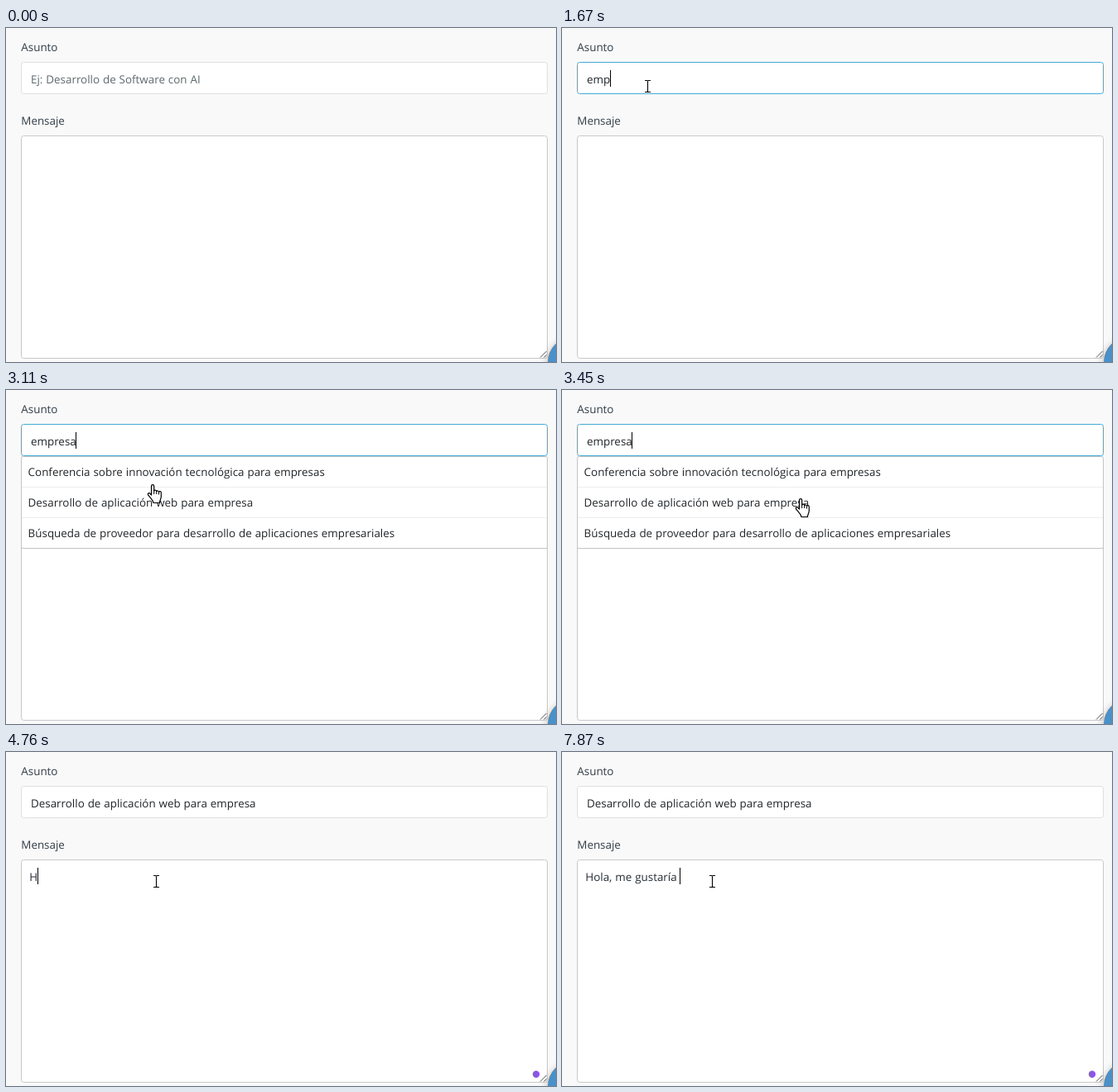
Recreate the animation shown at these times as an HTML page. Size 664 by 404 pixels, loop 8 s.

```html
<!DOCTYPE html>
<html lang="es">
<head>
<meta charset="utf-8">
<title>Formulario de contacto</title>
<style>
html, body { margin: 0; width: 100%; height: 100%; overflow: hidden; background: #f9f9f9; }
svg { display: block; width: 664px; height: 404px; }
text {
  font: 13.4px "Open Sans", "Noto Sans", sans-serif;
  word-spacing: .45px;
  white-space: pre;
  text-rendering: geometricPrecision;
  fill: #212529;
}
.label { fill: #313c46; }
</style>
</head>
<body>
<svg viewBox="0 0 664 404">
  <defs>
    <filter id="soft" x="-50%" y="-50%" width="200%" height="200%">
      <feGaussianBlur stdDeviation="5"/>
    </filter>
  </defs>
  <rect width="664" height="404" fill="#f9f9f9"/>

  <text class="label" x="18.3" y="28">Asunto</text>
  <text class="label" x="18.3" y="117">Mensaje</text>

  <rect id="field" x="18.5" y="41.5" width="635" height="38" rx="3" fill="#fff"/>
  <text id="subject" x="30" y="67"></text>

  <rect x="18.5" y="130.5" width="635" height="269" rx="3" fill="#fff" stroke="#c8c8c8"/>
  <text id="message" x="28.3" y="156"></text>
  <path d="M645 398.5l7.5-7.5M649.500 398.500l3-3" stroke="#555" fill="none"/>
  <circle id="dot" cx="640" cy="389.700" r="4.200" fill="#8957e5"/>

  <g id="list">
    <rect x="18.5" y="80.5" width="635" height="112" fill="#000" opacity=".06"/>
    <rect x="18.5" y="80.500" width="635" height="111" rx="2" fill="#fff" stroke="#c4c4c4"/>
    <path d="M19 117.5H653M19 154.5H653" stroke="#eee"/>
    <text x="26.6" y="104">Conferencia sobre innovación tecnológica para empresas</text>
    <text x="26.6" y="141">Desarrollo de aplicación web para empresa</text>
    <text x="26.6" y="178">Búsqueda de proveedor para desarrollo de aplicaciones empresariales</text>
  </g>

  <rect id="caret" width="1" height="20" fill="#000"/>

  <circle cx="684" cy="407" r="31" fill="#000" opacity=".24" filter="url(#soft)"/>
  <circle cx="684" cy="404" r="30" fill="#4a90c9"/>

  <g id="cursor">
    <path id="beam" d="M-3.500-7H-.8L0-6.300L.8-7H3.500M0-6.500V6.500M-3.500 7H-.8L0 6.300L.8 7H3.500"
      transform="translate(.5 .5)" fill="none" stroke="#000" stroke-width="1.1"/>
    <g id="hand" transform="translate(-6.500 -1)" stroke="#000" fill="#fff" stroke-linejoin="round">
      <path d="M5 13V2.200a1.600 1.600 0 0 1 3.200 0V8.500a1.500 1.500 0 0 1 3 .2a1.500 1.500 0 0 1 2.800.6a1.500 1.500 0 0 1 2.800.7V15c0 3-1.800 4-1.800 7.500H7.500C7 19 4 17 1 12.800C.2 11 2.300 10 3.600 11.400Z"
        stroke-width="1.200"/>
      <path d="M8.200 8.500V12M11.200 9V12M14 9.500V12.500" fill="none"/>
    </g>
    <path id="arrow" d="M0 0V16.500L3.800 13L6.300 18.500L8.800 17.400L6.400 12H11.500Z" fill="#fff" stroke="#000"/>
  </g>
</svg>
<script>
const LOOP = 8000, BLINK = 530;
const HINT = "Ej: Desarrollo de Software con AI";
const CHOICE = "Desarrollo de aplicación web para empresa";
const FOCUS = 650, OPEN = 2250, PICK = 3700, SWITCH = 4130;

const query = { text: "empresa", at: [1450, 1570, 1670, 1770, 1820, 1880, 1950] };
const note = {
  text: "Hola, me gustaría ",
  at: [4760, 4860, 4980, 5090, 5200, 5310, 5500, 5640, 5820,
       6030, 6150, 6280, 6410, 6550, 6680, 6950, 7080, 7330]
};
// time, x, y
const path = [
  [140, 190, 297], [600, 103, 70],
  [2760, 103, 70], [3110, 177, 115], [3600, 320, 137],
  [3930, 320, 137], [SWITCH, 181, 156]
];

const el = id => document.getElementById(id);
const show = (id, on) => el(id).setAttribute("visibility", on ? "visible" : "hidden");
const clamp = v => Math.min(1, Math.max(0, v));
const smooth = v => v * v * (3 - 2 * v);
const typed = (line, t) => line.text.slice(0, line.at.filter(k => k <= t).length);

function cursorAt(t) {
  let i = 0;
  while (i < path.length - 2 && t >= path[i + 1][0]) i++;
  const [t0, x0, y0] = path[i], [t1, x1, y1] = path[i + 1];
  const k = smooth(clamp((t - t0) / (t1 - t0)));
  return [Math.round(x0 + (x1 - x0) * k), Math.round(y0 + (y1 - y0) * k)];
}

function caretOn(t) {
  if (t < FOCUS) return false;
  if (t >= 7330) return t < 7600 || t >= 7870;
  const resets = [FOCUS, ...query.at, PICK, SWITCH, ...note.at];
  const last = Math.max(...resets.filter(k => k <= t));
  return Math.floor((t - last) / BLINK) % 2 === 0;
}

function setText(id, value, color) {
  const node = el(id);
  if (node.textContent !== value) node.textContent = value;
  node.style.fill = color;
}

function drawField(t) {
  const k = clamp((t - FOCUS) / 200) - clamp((t - SWITCH) / 200);
  const rest = [222, 224, 226], focus = [66, 170, 214];
  const rgb = rest.map((c, i) => Math.round(c + (focus[i] - c) * k));
  el("field").setAttribute("stroke", `rgb(${rgb})`);
  const value = t >= PICK ? CHOICE : typed(query, t);
  setText("subject", value || HINT, value ? "#212529" : "#5f686c");
  return value;
}

function drawCaret(t, value) {
  const inNote = t >= SWITCH;
  const width = inNote || value ? el(inNote ? "message" : "subject").getComputedTextLength() : 0;
  el("caret").setAttribute("x", Math.floor((inNote ? 28.3 : 30) + width));
  el("caret").setAttribute("y", inNote ? 140 : 51);
  show("caret", caretOn(t));
}

function drawCursor(t, open) {
  const [x, y] = cursorAt(t);
  const kind = y >= 80 && y < 192 && open ? "hand" : y >= 80 && y < 130 ? "arrow" : "beam";
  el("cursor").setAttribute("transform", `translate(${x} ${y})`);
  for (const id of ["beam", "hand", "arrow"]) show(id, t >= 140 && id === kind);
}

function draw(t) {
  const open = t >= OPEN && t < PICK;
  const value = drawField(t);
  setText("message", typed(note, t), "#262d35");
  show("list", open);
  show("dot", t >= SWITCH);
  drawCaret(t, value);
  drawCursor(t, open);
}

function tick() {
  draw(performance.now() % LOOP);
  requestAnimationFrame(tick);
}
tick();
</script>
</body>
</html>
```
